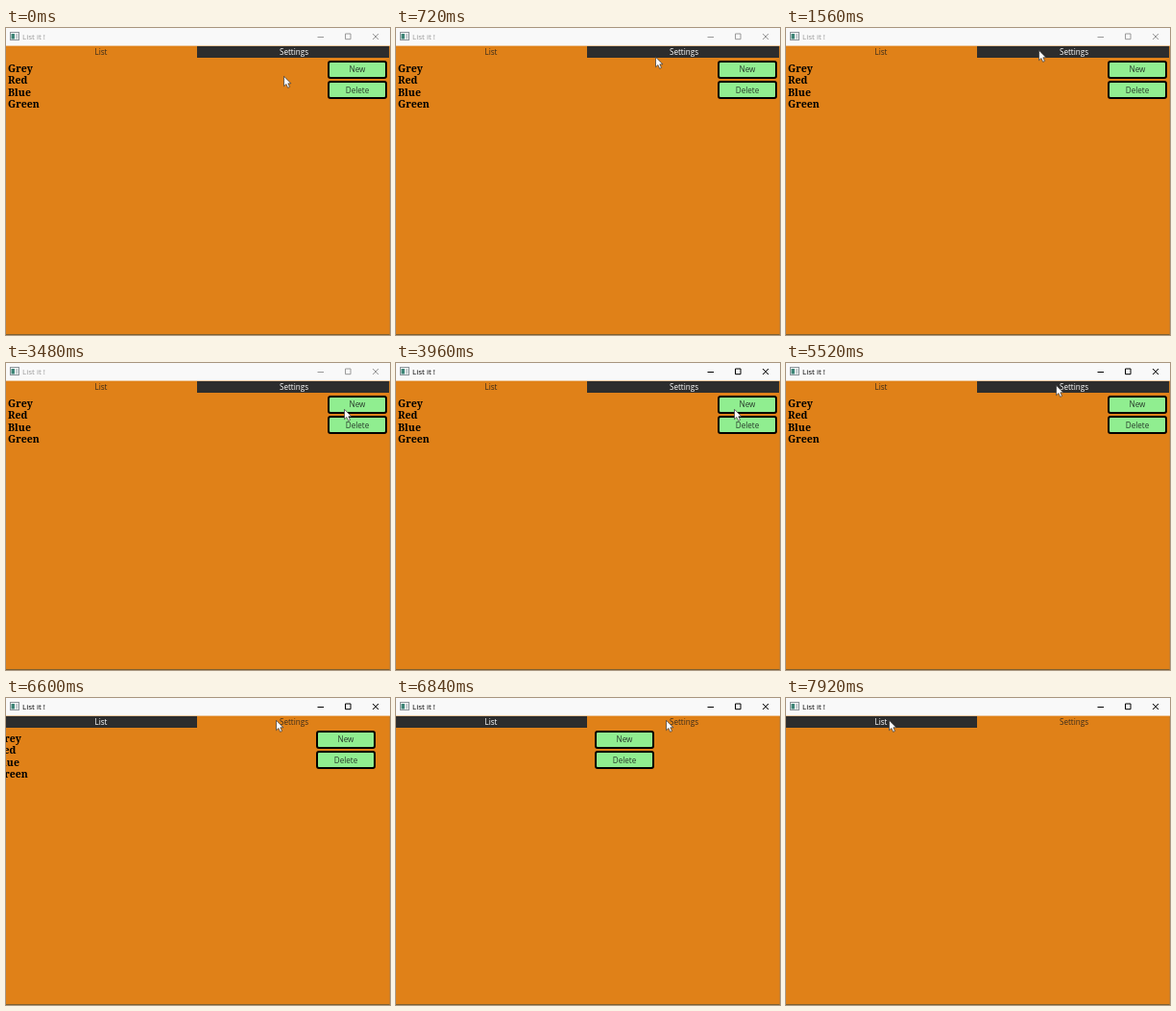
These frames come from a looping animation (400x320 px, 8.04 s). An HTML page:

```html
<!DOCTYPE html>
<html lang="en">
<head>
<meta charset="utf-8">
<title>List it !</title>
<style>
  html, body { margin: 0; width: 100%; height: 100%; overflow: hidden; background: #e08118; }
  svg { display: block; width: 400px; height: 320px; }
  text { font: 8.1px "Open Sans", sans-serif; }
  .mid { text-anchor: middle; }
  .items text { font: bold 10.6px "Noto Serif", serif; }
  .button rect { stroke: #000; stroke-width: 2; }
  .button text { fill: #26382a; }
</style>
</head>
<body>
<svg viewBox="0 0 400 320" xmlns="http://www.w3.org/2000/svg">
  <rect width="400" height="320" fill="#e08118"/>

  <g id="page">
    <g class="items">
      <text x="2" y="45.5">Grey</text>
      <text x="2" y="58">Red</text>
      <text x="2" y="70.5">Blue</text>
      <text x="2" y="83">Green</text>
    </g>
    <g class="button">
      <rect id="new" x="336" y="35" width="60" height="17" rx="2"/>
      <text class="mid" x="366" y="46.4">New</text>
    </g>
    <g class="button">
      <rect id="delete" x="336" y="56" width="60" height="17" rx="2"/>
      <text class="mid" x="366" y="67.6">Delete</text>
    </g>
  </g>

  <rect id="tabShade" y="19" width="200" height="12" fill="#2d2d2d"/>
  <text id="listTab" class="mid" x="99" y="28.2">List</text>
  <text id="settingsTab" class="mid" x="300" y="28.2">Settings</text>

  <rect width="400" height="18.6" fill="#f9f9f9"/>
  <g>
    <rect x="4.5" y="4.5" width="9" height="8" fill="#f4f6f6" stroke="#8c9499"/>
    <rect x="5.5" y="6" width="3.5" height="5.5" fill="#3d8577"/>
    <rect x="10" y="6" width="2.5" height="5.5" fill="#c5cdd0"/>
  </g>
  <g id="chrome">
    <text x="17" y="12" style="font-size:8px" fill="currentColor">List it !</text>
    <path d="M324.5 9.5H331M353.5 6H359V11.7H353.5ZM382 6L388 12M388 6L382 12"
      fill="none" stroke="currentColor"/>
  </g>

  <path d="M0 319.5H400" stroke="#80602f"/>
  <path d="M399.7 19V320" stroke="#b57a35" stroke-width=".6"/>
  <path id="cursor" d="M0 0V10.4L2.4 8.2L4.1 12L6 11.1L4.3 7.5H7.4Z"
    fill="#fff" stroke="#333" stroke-width=".7" stroke-linejoin="round"/>
</svg>
<script>
  const LOOP = 8040, STEP = 120;
  const byId = id => document.getElementById(id);
  const [page, newBtn, deleteBtn, shade, listTab, settingsTab, chrome, cursor] =
    ["page", "new", "delete", "tabShade", "listTab", "settingsTab", "chrome", "cursor"].map(byId);

  // Pointer stops: time, x, y
  const pointer = [
    [0, 289, 50], [1080, 263, 23], [2760, 263, 23], [3480, 352, 48], [3960, 352, 48],
    [4320, 355, 63], [5040, 355, 63], [5520, 281, 23], [7320, 281, 23], [7920, 107, 23]
  ];
  // Page slide: time, offset
  const slide = [[6480, 0], [6600, 12], [6720, 56], [6840, 128], [6960, 280], [7080, 400]];

  const smooth = p => p * p * (3 - 2 * p);
  const linear = p => p;
  const between = (t, from, to) => t >= from && t < to;

  function sample(keys, t, ease) {
    const next = keys.findIndex(k => k[0] > t);
    if (next === 0) return keys[0].slice(1);
    if (next < 0) return keys[keys.length - 1].slice(1);
    const a = keys[next - 1], b = keys[next];
    const p = ease((t - a[0]) / (b[0] - a[0]));
    return a.slice(1).map((v, i) => v + (b[i + 1] - v) * p);
  }

  function paintButton(rect, pressed) {
    rect.setAttribute("fill", pressed ? "#008000" : "#90ee90");
  }

  function draw(time) {
    const t = Math.floor(time % LOOP / STEP) * STEP;
    const onSettings = t >= 6600;
    const [x, y] = sample(pointer, t, smooth).map(Math.round);
    const [offset] = sample(slide, t, linear);

    cursor.setAttribute("transform", `translate(${x + .5} ${y + .3})`);
    page.setAttribute("transform", `translate(${-offset} 0)`);
    paintButton(newBtn, between(t, 3600, 3960));
    paintButton(deleteBtn, between(t, 4680, 5040));
    shade.setAttribute("x", onSettings ? -1 : 199);
    listTab.setAttribute("fill", onSettings ? "#fff" : "#3a2c1c");
    settingsTab.setAttribute("fill", onSettings ? "#3a2c1c" : "#fff");
    chrome.setAttribute("color", t < 3600 ? "#999" : "#000");
  }

  function tick(now) {
    draw(now);
    requestAnimationFrame(tick);
  }
  draw(0);
  requestAnimationFrame(tick);
</script>
</body>
</html>
```
